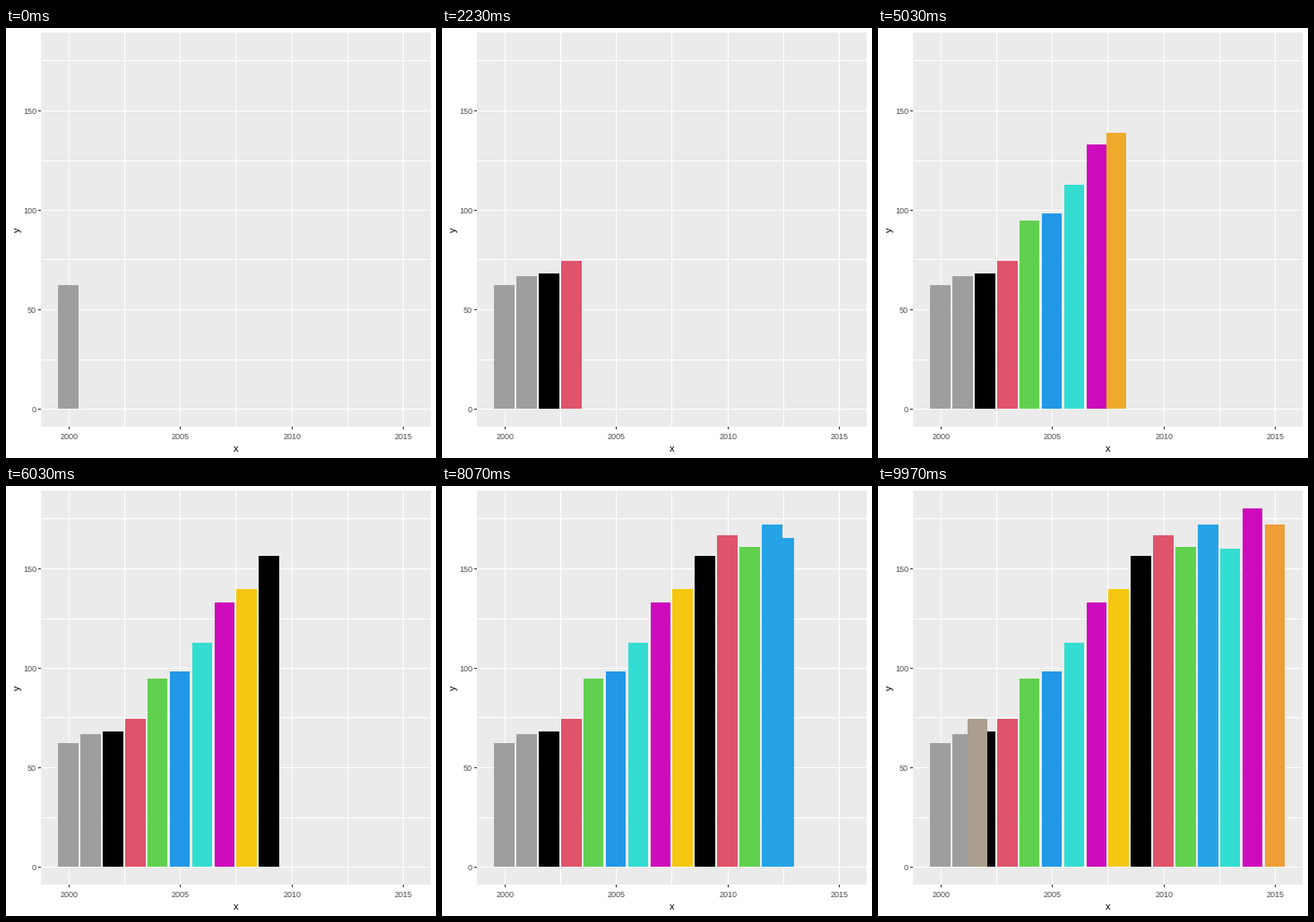
These frames come from a looping animation (480 by 480 pixels, 10000 ms). A matplotlib script:

```python
import matplotlib.pyplot as plt
from matplotlib.animation import FuncAnimation
from matplotlib.colors import to_rgb
from matplotlib.patches import Rectangle
import numpy as np

SIZE, FRAMES, LOOP_MS = 480, 300, 10000
STEPS = 9                       # frames per move
X0, YEAR_W = 69.76, 24.88       # px position of 2000, px per year
Y0, UNIT_H = 425, 2.22          # px position of zero, px per unit

VALUES = np.array([62.2, 66.7, 68.0, 74.3, 94.6, 98.2, 112.6, 132.9,
                   139.6, 156.3, 166.7, 160.8, 172.1, 159.9, 180.2, 172.1])
N = len(VALUES)
GREY, BLACK, RED, GREEN = "#9e9e9e", "#000000", "#df536b", "#61d04f"
BLUE, CYAN, MAGENTA, YELLOW = "#2297e6", "#33ddd2", "#cd0bbc", "#f5c710"
COLORS = [GREY, GREY, BLACK, RED, GREEN, BLUE, CYAN, MAGENTA, YELLOW,
          BLACK, RED, GREEN, "#25a3e6", CYAN, MAGENTA, "#ee9f36"]
# Tints used while a bar is the newest one
FRESH = {6: "#3fd7a5", 15: "#b0c832"}
PURPLE = "#8a45a0"

# First moving frame of each state
STARTS = [10 + 19 * i if i < 13 else 256 + 18 * (i - 13) for i in range(N)]

fig = plt.figure(figsize=(SIZE / 100, SIZE / 100), dpi=100, facecolor="white")
ax = fig.add_axes([0, 0, 1, 1])
ax.set(xlim=(0, SIZE), ylim=(SIZE, 0))
ax.axis("off")


def box(x, y, w, h, color, z=1):
    return ax.add_patch(Rectangle((x, y), w, h, fc=color, lw=0,
                                  antialiased=False, zorder=z))


def label(x, y, text, px, color, **kw):
    ax.text(x, y, text, fontsize=px * 0.72, color=color,
            family="Liberation Sans", **kw)


def draw_axes():
    box(39, 5, 435, 440, "#ebebeb")
    for v in range(0, 176, 25):
        y = round(Y0 - v * UNIT_H)
        box(39, y, 435, 1, "white")
        if v % 50 == 0:
            box(36, y, 3, 1, "#333333")
            label(34, y + 4, str(v), 9, "#4d4d4d", ha="right")
    for k in range(7):
        x = round(X0 + 2.5 * k * YEAR_W)
        box(x, 5, 1, 440, "white")
        if k % 2 == 0:
            box(x, 445, 1, 3, "#333333")
            label(x + 0.5, 459, str(2000 + 5 * k // 2), 9, "#4d4d4d", ha="center")
    label(256.5, 473, "x", 11, "black", ha="center")
    label(12.5, 225.5, "y", 11, "black", ha="center", va="center", rotation=90)


def place(bar, pos, value, color):
    mid = X0 + pos * YEAR_W
    left, right = round(mid - 11.31), round(mid + 11.2)
    top = round(Y0 - value * UNIT_H)
    bar.set_bounds(left, top, right - left, Y0 - top)
    bar.set_facecolor(color)


def mix(a, b, t):
    return tuple((1 - t) * np.array(to_rgb(a)) + t * np.array(to_rgb(b)))


def fresh(i):
    return FRESH.get(i, COLORS[i])


draw_axes()
marks = [box(0, 0, 1, 1, "white", 2) for _ in range(N)]
mover = box(0, 0, 1, 1, "white", 3)
for i, mark in enumerate(marks):
    place(mark, i, VALUES[i], COLORS[i])


def update(frame):
    # state i is held until STARTS[i], then travels to the next one
    begun = sum(frame >= s for s in STARTS)
    for i, mark in enumerate(marks):
        mark.set_visible(i < begun)
    marks[14].set_facecolor(PURPLE if begun < N else MAGENTA)

    if begun == 0:
        place(mover, 0, VALUES[0], fresh(0))
        return [*marks, mover]

    a, b = begun - 1, begun % N
    t = min((frame - STARTS[a] + 1) / STEPS, 1)
    # colour holds for the first part of the move
    k = max(0, (t * STEPS - 5) / (STEPS - 5))
    k = k * k * (3 - 2 * k)
    source = COLORS[a] if b == 0 else fresh(a)
    place(mover, a + (b - a) * t, VALUES[a] + (VALUES[b] - VALUES[a]) * t,
          mix(source, fresh(b), k))
    return [*marks, mover]


anim = FuncAnimation(fig, update, frames=FRAMES, interval=LOOP_MS / FRAMES,
                     repeat=True, repeat_delay=0)
plt.show()
```
